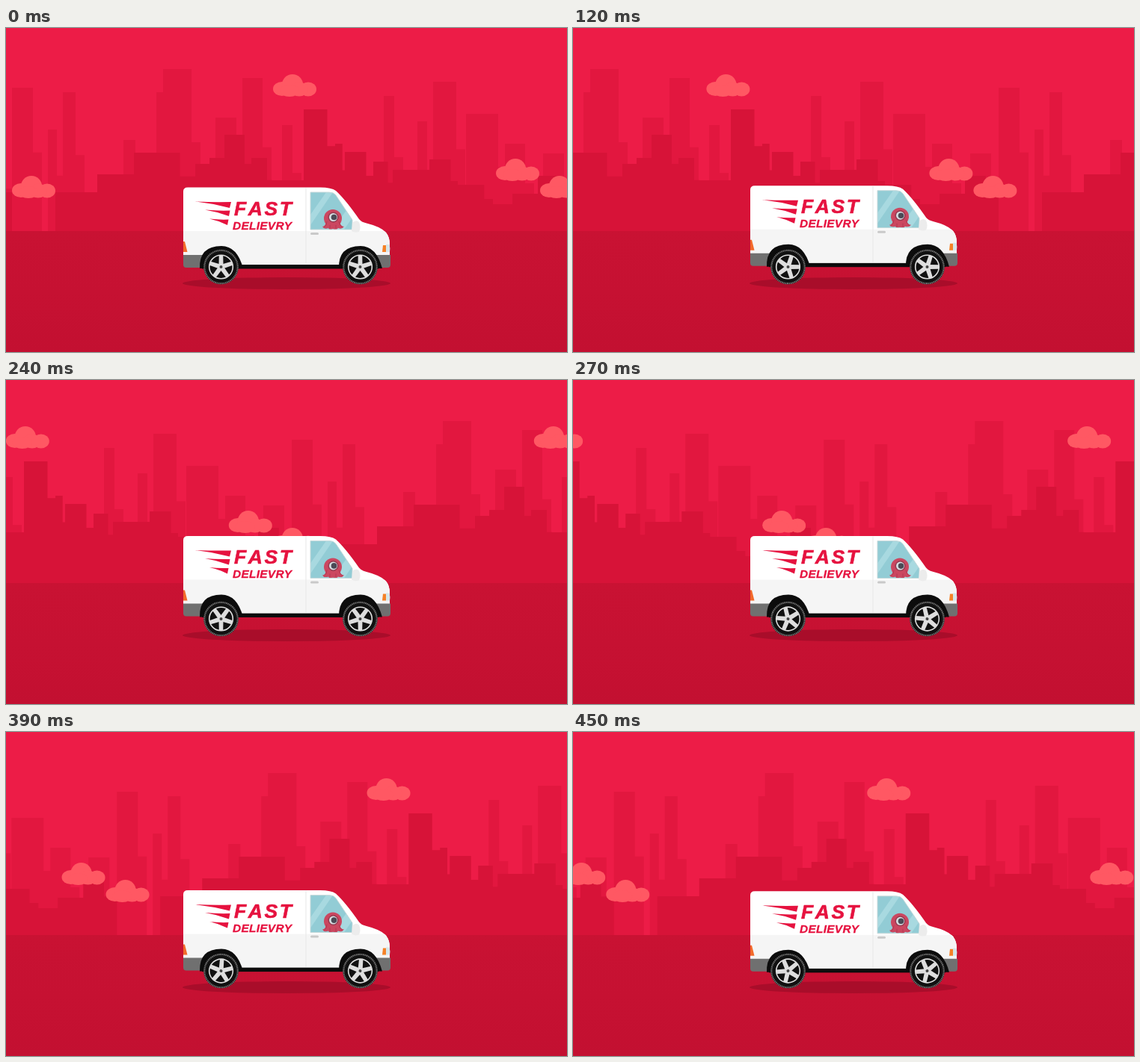
An HTML page for the animation above (480 ms loop, 750 px wide and 434 px high).

```html
<!DOCTYPE html>
<html lang="en">
<head>
<meta charset="utf-8">
<title>Fast delivery</title>
<style>
html, body { margin: 0; width: 100%; height: 100%; overflow: hidden; background: #c51132; }
svg { display: block; width: 100vw; height: 100vh; }
text { font-family: "Liberation Sans", Arial, sans-serif; font-weight: bold; font-style: italic; font-kerning: none; stroke: #e6123f; }
</style>
</head>
<body>
<svg viewBox="0 0 750 434" xmlns="http://www.w3.org/2000/svg">
  <defs>
    <linearGradient id="road" x2="0" y2="1">
      <stop offset="0" stop-color="#c91233"/><stop offset="1" stop-color="#c31031"/>
    </linearGradient>
    <path id="hull" d="M237 304V219Q237 213.5 243 213.5H420Q435 213.5 441 218Q454 230 472 256Q475 260 482 261.5Q500 266 507 273Q513 279 513 290V317H237Z"/>
    <path id="pane" d="M407 220H432Q438 220 441 224L463 257V270H407Z"/>
    <clipPath id="glass"><use href="#pane"/></clipPath>
    <clipPath id="shell"><use href="#hull"/></clipPath>
    <g id="cloud" fill="#ff5863">
      <ellipse cx="12" cy="19.5" rx="12" ry="9.5"/><circle cx="26" cy="14" r="14"/>
      <ellipse cx="47" cy="20" rx="11" ry="9.5"/><ellipse cx="35" cy="20" rx="12" ry="9.5"/>
      <ellipse cx="22" cy="22" rx="13" ry="8"/>
    </g>
    <g id="city"><path id="far" fill="#e2173f"/><path id="near" fill="#d71338"/></g>
  </defs>

  <rect width="750" height="273" fill="#ed1c47"/>
  <g id="skyline">
    <use href="#city" x="-748"/><use href="#city"/><use href="#city" x="748"/>
  </g>
  <g id="clouds"></g>
  <rect y="272" width="750" height="162" fill="url(#road)"/>
  <ellipse cx="375" cy="342" rx="139" ry="8" fill="#a90d2a"/>

  <g id="van">
    <rect x="262" y="308" width="236" height="14.5" fill="#0c0c0c"/>
    <use href="#hull" fill="#fff"/>
    <rect x="237" y="272" width="277" height="45" fill="#f5f5f5" clip-path="url(#shell)"/>
    <path d="M401 214V316" stroke="#e7e7e7"/>
    <g clip-path="url(#glass)">
      <rect x="406" y="219" width="59" height="52" fill="#92ccd5"/>
      <path d="M407 250L428 220H437L407 264ZM436 270L456 243L463 254L452 270Z" fill="#a8d9e0"/>
      <g fill="#cb4760">
        <circle cx="437" cy="255" r="12"/>
        <path d="M428 259Q427 266 423 266Q425 270 431 268Q433 272 437 269Q441 272 444 268Q449 270 452 266Q447 266 446 259Z"/>
      </g>
      <path d="M429 259Q429 265 425 267M433 264V269M441 264V269M445 259Q446 265 450 267" fill="none" stroke="#b03a54"/>
      <circle cx="437.5" cy="253.5" r="7" fill="#963a50"/>
      <circle cx="437.5" cy="253.5" r="5.5" fill="#d5dde1"/>
      <circle cx="438.5" cy="253.5" r="3.8" fill="#4a4a56"/>
    </g>
    <use href="#pane" fill="none" stroke="#c6d8da"/>
    <path d="M463 261Q468 256 472 260Q475 267 472 273Q466 275 462 272Z" fill="#ececec"/>
    <rect x="407" y="274" width="11" height="3" rx="1.5" fill="#c9c9c9"/>
    <path d="M237 286H239L242.5 300H237Z" fill="#f26a2b"/>
    <path d="M508 290H512.5Q514 295 513 300H508Z" fill="#d5e6ea"/>
    <path d="M504 291H508V300H503Z" fill="#f58228"/>
    <path d="M237 304H264V321H241Q237 321 237 317ZM494 304H514V317Q514 321 510 321H494Z" fill="#707070"/>
    <g fill="#0c0c0c">
      <path id="arch" d="M259 322Q258 292 288 292Q309 292 317 322Z"/>
      <use href="#arch" x="186"/>
    </g>
    <g fill="#e6123f">
      <path d="M253 232.5Q277 233.5 301 233L299 241Q276 235 253 232.5Z"/>
      <path d="M266 243.5Q282 245 299.5 244.5L298 252Q282 246 266 243.5Z"/>
      <path d="M272 255.5Q284 257 297.5 256.5L296 264Q284 258 272 255.5Z"/>
      <text x="305" y="250.5" font-size="26.5" letter-spacing="2.6" stroke-width=".6">FAST</text>
      <text x="303" y="269.5" font-size="15.4" letter-spacing=".3" stroke-width=".3">DELIEVRY</text>
    </g>
  </g>

  <g id="wheels"></g>
</svg>
<script>
const $ = id => document.getElementById(id);
const FRAME = 30, FRAMES = 16;
const CITY_STEP = 46.75, CLOUD_STEP = 44.65, CLOUD_SPAN = 706;
const HORIZON = 273;

const block = (x, w, top) => `M${x} ${HORIZON}V${top}h${w}V${HORIZON}Z`;
const lower = (top, part) => top + (HORIZON - top) * part;

// left, width, top; each tower gets a narrow annex on its right
const towers = [
  [8, 28, 80], [56, 12, 136], [76, 17, 86], [157, 16, 150], [201, 10, 86],
  [210, 38, 55], [280, 28, 120], [316, 27, 67], [369, 14, 130], [505, 14, 91],
  [550, 13, 125], [571, 31, 72], [615, 43, 115], [667, 27, 155], [718, 28, 168]
];
$("far").setAttribute("d", towers.map(([x, w, top]) =>
  block(x, w, top) + block(x + w, 12, lower(top, .45))).join(""));

// left, top; a roof runs to the next one if that is taller, else steps down first
const roofs = [
  [66, 220], [122, 196], [171, 167], [253, 182], [272, 174], [292, 143], [328, 174],
  [356, 204], [398, 109], [440, 155], [453, 166], [491, 179], [517, 190], [566, 176],
  [604, 210], [651, 236], [677, 222], [711, 198], [748, 220], [788, HORIZON]
];
$("near").setAttribute("d", roofs.slice(0, -1).map(([x, top], i) => {
  const [end, nextTop] = roofs[i + 1];
  const w = end - x;
  return nextTop < top || end === 788
    ? block(x, w, top)
    : block(x, w * .75, top) + block(x, w, lower(top, .3));
}).join(""));

const spokes = Array.from({ length: 5 }, (_, i) =>
  `<path d="M-3 -3L-2.7 -15.5H2.7L3 -3Z" transform="rotate(${i * 72})"/>`).join("");

$("wheels").innerHTML = [287.5, 473.5].map(x =>
  `<g transform="translate(${x} 320)">
    <circle r="23.2" fill="#111"/>
    <g class="spin">
      <circle r="22.2" fill="none" stroke="#6c6c6c" stroke-width="2.2" stroke-dasharray="1.6 .7"/>
      <circle r="15.8" fill="none" stroke="#dedede" stroke-width="1.6"/>
      <g fill="#dedede">${spokes}<circle r="4.6"/></g>
      <circle r="2" fill="#444"/>
    </g>
  </g>`).join("");
const spins = document.querySelectorAll(".spin");

const clouds = [[357, 62], [655, 175], [8, 198]].map(([x, y]) => {
  $("clouds").insertAdjacentHTML("beforeend",
    `<g><use href="#cloud" y="${y}"/><use href="#cloud" x="${CLOUD_SPAN}" y="${y}"/></g>`);
  return { x, node: $("clouds").lastElementChild };
});

const move = (node, x, y) => node.setAttribute("transform", `translate(${x} ${y})`);

function draw(ms) {
  const n = Math.floor(ms / FRAME) % FRAMES;
  const turn = n / FRAMES;
  move($("skyline"), -n * CITY_STEP, 0);
  for (const c of clouds) move(c.node, c.x - n * CLOUD_STEP, 0);
  move($("van"), 0, -2.3 * (1 - Math.cos(turn * 2 * Math.PI)));
  for (const s of spins) s.setAttribute("transform", `rotate(${turn * 360})`);
}

const start = performance.now();
function tick() {
  draw(performance.now() - start);
  requestAnimationFrame(tick);
}
tick();
</script>
</body>
</html>
```
